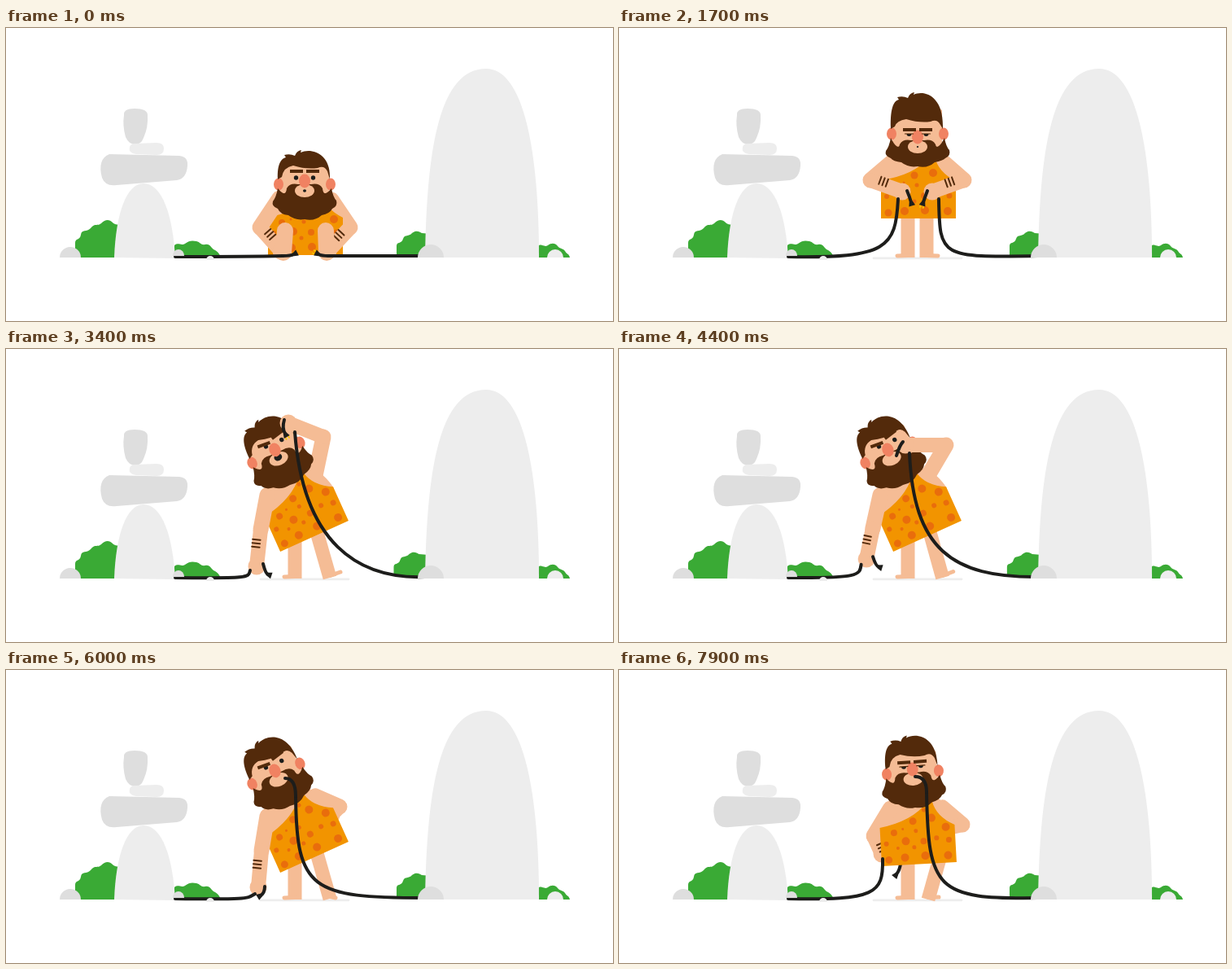
An HTML page with a canvas for the animation above (8000 ms loop, 746 px wide and 360 px high).

```html
<!DOCTYPE html>
<html lang="en">
<head>
<meta charset="utf-8">
<title>Caveman and the cable</title>
<style>
html, body { margin: 0; width: 100%; height: 100%; overflow: hidden; background: #fff; }
canvas { display: block; width: 746px; height: 360px; }
</style>
</head>
<body>
<canvas id="stage" width="746" height="360"></canvas>
<script>
const g = document.getElementById('stage').getContext('2d');
const LOOP = 8000, STEP = 100;
const SKIN = '#f5bc95', HAIR = '#532a0b', CLOTH = '#f29400', SPOT = '#e96d0c', RED = '#f08262',
  GREEN = '#3aaa35', PALE = '#ededed', GREY = '#dedede', INK = '#1d1d1b';

// head: x, y, tilt, look down, crown height. body: hem x, y, tilt. arms: elbow, hand.
// wires: two controls and end. tips: curve of the loose end. legs: top, ankle, toe.
// face: brow height, brow tilt, lids, mouth size, tongue.
// flags: sitting, left arm behind, right arm behind, fingers, biting, left bands, right bands.
const sit = {
  head: [367, 192, 0, 0, 0], body: [368, 279, 0],
  armL: [312, 245, 338, 274], armR: [423, 245, 396, 274],
  wireL: [250, 281, 300, 281, 340, 280], tipL: [340, 280, 350, 280, 354, 278],
  wireR: [480, 280, 430, 280, 396, 280], tipR: [396, 280, 388, 280, 384, 278],
  legL: [343, 249, 341, 276, 338, 278], legR: [393, 249, 394, 276, 397, 278],
  face: [-16, 0, 0, 2, 0], flags: [1, 0, 0, 0, 0, 1, 1], bush: [0]
};
const hold = {
  head: [367, 130, 0, 1, 9], body: [368, 234, 0],
  armL: [309, 187, 348, 201], armR: [424, 187, 385, 201],
  wireL: [330, 283, 340, 270, 343, 210], tipL: [354, 200, 357, 207, 359, 214],
  wireR: [395, 282, 394, 282, 393, 210], tipR: [379, 200, 376, 208, 374, 214],
  legL: [355, 225, 355, 282, 342, 280], legR: [378, 225, 378, 282, 392, 280],
  face: [-13, 0, 1, 1.2, 0], flags: [0, 0, 0, 0, 0, 1, 1], bush: [0]
};
const reach = {
  ...hold,
  head: [332, 127.5, -23.3, 0, 4], body: [379, 230, -24.3],
  armL: [322, 222, 325, 264], armR: [379, 108, 355, 75],
  wireL: [290, 281, 298, 281, 317, 258], tipL: [332, 262, 334, 274, 341, 278],
  wireR: [432, 283, 366, 236, 360, 85], tipR: [350, 70, 344, 77, 338, 83],
  legR: [381, 225, 394, 281, 407, 272],
  face: [-16, .25, 0, 5, 1], flags: [0, 0, 0, 0, 0, -1, 0], bush: [-3.5]
};
const aim = {
  ...reach,
  armL: [313, 222, 308, 267], armR: [390, 108, 347, 91],
  wireL: [300, 282, 298, 281, 300, 272], tipL: [316, 264, 319, 276, 322, 277],
  wireR: [432, 283, 365, 238, 355, 102], tipR: [342, 87, 339, 97, 343, 104],
  legR: [382, 225, 398, 281, 411, 274],
  face: [-16, .25, 0, 5, 0]
};
const bite = {
  ...aim,
  armR: [402, 118, 352, 118],
  wireR: [408, 281, 362, 245, 357, 128], tipR: [349, 114, 345, 118, 341, 131],
  face: [-16, .25, 0, 0, 0], flags: [0, 0, 0, 0, 1, -1, 0]
};
const lift = {
  ...bite,
  armL: [301, 214, 271, 181],
  wireL: [268, 281, 278, 248, 277, 203], tipL: [278, 180, 286, 186, 294, 188],
  legR: [382, 225, 394, 281, 408, 269],
  flags: [0, 0, 0, 1, 1, -.12, 0], bush: [0]
};
const mouth = {
  ...lift,
  armL: [314, 222, 310, 267], armR: [410, 168, 400, 178],
  wireL: [300, 282, 296, 281, 306, 275], tipL: [318, 266, 318, 274, 313, 277],
  wireR: [375, 280, 357, 270, 356, 155], tipR: [356, 155, 356, 133, 343, 133],
  legR: [382, 225, 398, 281, 405, 280],
  flags: [0, 0, 1, 0, 1, -1, 0]
};
const turn = {
  ...mouth,
  head: [361, 126, -4, 0, 4], body: [369, 238.5, -3.1],
  armL: [313, 204, 323, 226], armR: [422, 190, 405, 194],
  wireL: [315, 283, 325, 275, 324, 232], tipL: [346, 238, 345, 246, 341, 251],
  wireR: [390, 282, 380, 270, 378, 150], tipR: [378, 150, 378, 131, 364, 131],
  legR: [394, 232, 380, 282, 393, 279],
  face: [-13, 0, 1, 0, 0], flags: [0, 1, 1, 0, 1, 1, 0]
};
const track = [
  [0, sit], [400, sit], [900, hold], [1700, hold], [2100, reach], [3200, reach], [3400, aim],
  [3600, aim], [4100, bite], [4300, bite], [4800, lift], [5300, lift], [6000, mouth],
  [7000, mouth], [7500, turn], [LOOP, turn]
];

function poseAt(t) {
  let i = 0;
  while (i < track.length - 2 && t >= track[i + 1][0]) i++;
  const [t0, a] = track[i], [t1, b] = track[i + 1];
  const u = (t - t0) / (t1 - t0), e = u * u * (3 - 2 * u);
  const p = {};
  for (const k in a) p[k] = a[k].map((v, j) => v + (b[k][j] - v) * e);
  return p;
}

// Drawing helpers
function fill(d, color) {
  g.fillStyle = color;
  g.fill(new Path2D(d));
}
function oval(x, y, rx, ry, color, a = 0, b = Math.PI * 2) {
  g.fillStyle = color;
  g.beginPath();
  g.ellipse(x, y, rx, ry, 0, a, b);
  g.fill();
}
function stroke(d, w, color, cap = 'round') {
  g.lineWidth = w;
  g.strokeStyle = color;
  g.lineCap = cap;
  g.lineJoin = 'round';
  g.stroke(new Path2D(d));
}
const line = (x0, y0, x1, y1, w, color, cap) => stroke(`M${x0},${y0}L${x1},${y1}`, w, color, cap);
const mound = (x, y, rx, ry, color) => oval(x, y, rx, ry, color, Math.PI, 0);
function local(x, y, deg, draw) {
  g.save();
  g.translate(x, y);
  g.rotate(deg * Math.PI / 180);
  draw();
  g.restore();
}
function joint([x, y, deg], dx, dy) {
  const r = deg * Math.PI / 180, c = Math.cos(r), s = Math.sin(r);
  return [x + dx * c - dy * s, y + dx * s + dy * c];
}

function backdrop(shift) {
  fill('M85,282V264C85,258 91,261 92,254C93,247 99,251 104,246C109,239 113,244 117,240C122,235 127,235 131,239' +
    'C134,242 136,241 140,242V282Z', GREEN);
  fill('M207,282V267C212,263 215,268 220,265C225,261 229,261 234,262C239,263 239,267 245,266C251,265 252,270 255,272' +
    'C259,274 262,276 264,282Z', GREEN);
  local(shift, 0, 0, () =>
    fill('M480,279V268C480,262 486,266 488,259C490,253 495,257 499,252C504,248 508,250 511,252L523,253V279Z', GREEN));
  fill('M654,268C658,264 661,270 666,267C670,264 675,264 678,268C681,272 684,270 687,274C689,278 692,277 693,282H654Z', GREEN);
  mound(79, 282, 13, 13, GREY);
  fill('M145,107Q144,99 158,99Q174,99 174,107Q175,122 169,135Q166,143 159,143Q151,143 147,134Q143,120 145,107Z', GREY);
  fill('M152,146Q153,142 160,142L185,141Q194,141 194,148Q194,156 185,156L160,155Q150,154 152,146Z', PALE);
  fill('M127,155L213,157Q224,158 223,169Q222,185 210,187L136,193Q122,195 118,184Q112,161 127,155Z', GREY);
  fill('M133,282C135,228 148,191 169,191C192,191 205,230 208,283Z', PALE);
  fill('M515,282C517,150 532,50 590,50C636,50 655,150 655,282Z', PALE);
}
function pebbles() {
  mound(212, 280, 7, 8, GREY);
  mound(251, 285, 5, 5, PALE);
  mound(522, 282, 16, 16, GREY);
  mound(675, 282, 10, 10, PALE);
}

function bands(ex, ey, hx, hy, side, at) {
  const len = Math.hypot(hx - ex, hy - ey) || 1, s = Math.sign(side);
  const dx = (hx - ex) / len, dy = (hy - ey) / len, nx = dy * s, ny = -dx * s;
  const inner = 8.5 - 9.5 * Math.abs(side);
  for (let i = -1; i < 2; i++) {
    const x = ex + dx * (len * at + i * 4.5), y = ey + dy * (len * at + i * 4.5);
    line(x + nx * inner, y + ny * inner, x + nx * 8.5, y + ny * 8.5, 2, HAIR);
  }
}
function forearm([ex, ey, hx, hy], side, at) {
  line(ex, ey, hx, hy, 18, SKIN);
  oval(hx, hy, 10.5, 10.5, SKIN);
  if (side) bands(ex, ey, hx, hy, side, at);
}
function leg([x0, y0, x1, y1, tx, ty], seated) {
  if (seated) return line(x0, y0, x1, y1, 20, SKIN);
  line(x0, y0, x1, y1, 17, SKIN, 'butt');
  line(x1, y1 - 2.5, tx, ty, 5, SKIN);
}

const spots = [
  [-5, -53, 4.5], [18, -56, 5], [35, -44, 5], [-29, -40, 4], [-15, -29, 5], [-39, -27, 3],
  [-25, -21, 2], [-5, -21, 2.5], [7, -28, 4], [23, -31, 3], [38, -28, 3.5], [-37, -7, 4.5],
  [-17, -9, 5], [8, -10, 5], [36, -9, 5], [-2, -41, 2.5], [-18, -44, 1.5], [9, -66, 2.5]
];
const torso = () => fill('M-42,-42L-41,-60Q-38,-80 -18,-84H18Q40,-78 46,-45L40,-4H-40Z', SKIN);
function cloth() {
  fill('M-46,0V-47Q-5,-53 14,-76H20Q24,-57 46,-46V0Z', CLOTH);
  for (const [x, y, r] of spots) oval(x, y, r, r, SPOT);
}

function head(look, crown, [browY, browTilt, lid, size, tongue]) {
  const d = 8 * look, top = -crown, rim = 5 * look, chin = 3 * look;
  fill(`M-31,10V${-20 + top}Q0,${-46 + top} 30,${-20 + top}V10Q20,35 0,35Q-20,35 -31,10Z`, SKIN);
  oval(-32, 0, 6, 7.5, RED);
  oval(32, 0, 6, 7.5, RED);
  fill(`M-33,-6C-34,${-26 + top} -28,${-32 + top} -23,${-33 + top}L-25,${-36 + top}` +
    `Q-18,${-38 + top} -12,${-35 + top}Q-10,${-41 + top} -4,${-42 + top}L-5,${-39 + top}` +
    `C8,${-45 + top} 31,${-38 + top} 31,-10V-6L28,${-16 + rim}Q24,${-24 + rim} 16,${-20 + rim}` +
    `Q2,${-18 + rim} -14,${-23 + rim}Q-26,${-21 + rim} -28,-9Z`, HAIR);

  const by = 44 - chin;
  fill(`M-33,5C-28,${11 + d / 2} -23,${15 + d / 2} -22,${5 + d}Q-18,${-2 + d} -8,${d}H8Q18,${-2 + d} 22,${5 + d}` +
    `C23,${15 + d / 2} 28,${11 + d / 2} 33,5Q35,16 39,20Q41,27 34,30Q31,${by - 8} 21,${by - 6}` +
    `Q12,${by + 2} 0,${by - 1}Q-11,${by + 1} -20,${by - 6}Q-30,${by - 7} -33,30Q-41,27 -39,21Q-35,16 -33,5Z`, HAIR);
  oval(0, 8 + d, 12, 8, SKIN);

  const angry = browTilt / .25, mx = -7 * tongue;
  if (size > .5) oval(mx, 8 + d - 2 * angry - tongue, size, size * .85, INK);
  if (tongue > .5) oval(mx - 1, 7 + d, 4, 2.5, '#e30613');
  oval(0, -4 + d, 7, 8.5, RED);

  for (const s of [-1, 1]) {
    const x = s * 10.5 + 2 * angry, y = -8 + d - 4 * angry;
    if (lid > .5) {
      oval(x, y, 3, 3, INK, 0, Math.PI);
      line(x - 5, y, x + 5, y, 1.2, HAIR);
    } else oval(x, y, 2.7, 2.7, INK);
    const bx = s * 10, yb = browY + d - (s > 0 ? 4 : -1) * angry;
    const k = browTilt * (s > 0 ? 8 : -2);
    line(bx - 8, yb + k, bx + 8, yb - k, 4, HAIR, 'butt');
  }
}

function wire(x, y, [a, b, c, d, ex, ey]) {
  stroke(`M${x},${y}C${a},${b} ${c},${d} ${ex},${ey}`, 4, INK);
}
function tip([x, y, cx, cy, ex, ey], plug, copper) {
  stroke(`M${x},${y}Q${cx},${cy} ${ex},${ey}`, 4, INK);
  if (!plug) return;
  local(ex, ey, Math.atan2(ey - cy, ex - cx) * 180 / Math.PI, () => {
    if (copper) {
      line(4, -2, 7, -2, 1.6, '#f7c600');
      line(4, 2, 7, 2, 1.6, '#f7c600');
    }
    fill('M-1,-2L4.5,-4V4L-1,2Z', INK);
  });
}

function draw(t) {
  const p = poseAt(t);
  const [seated, backL, backR, fingers, biting, sideL, sideR] = p.flags;
  const sitting = seated > .5, inBody = f => local(...p.body, f);
  const shL = joint(p.body, -32, -70), shR = joint(p.body, 32, -68);
  const armL = () => {
    line(...shL, p.armL[0], p.armL[1], 19, SKIN);
    forearm(p.armL, sideL, backL > .5 ? .68 : .38);
    if (fingers > .3) {
      const [, , x, y] = p.armL;
      line(x, y, x + 3, y - 21 * fingers, 6.5, SKIN);
      line(x + 3, y, x + 15 * fingers, y - 19 * fingers, 6.5, SKIN);
    }
  };
  const legs = () => { leg(p.legL, sitting); leg(p.legR, sitting); };

  g.clearRect(0, 0, 746, 360);
  backdrop(p.bush[0]);
  if (!sitting) {
    line(313, 282.8, 421, 282.8, 2.8, PALE);
    legs();
  }
  inBody(torso);
  line(...shR, p.armR[0], p.armR[1], 19, SKIN);
  if (backR > .5) forearm(p.armR, 0);
  if (backL > .5) {
    tip(p.tipL, true);
    armL();
  }
  inBody(cloth);
  if (backL <= .5) armL();
  if (sitting) {
    forearm(p.armR, -sideR, .42);
    legs();
  }
  const [hx, hy, tilt, look, crown] = p.head;
  local(hx, hy, tilt, () => head(look, crown, p.face));
  if (!sitting && backR <= .5) forearm(p.armR, -sideR, .42);

  wire(208, 281, p.wireL);
  wire(515, 280, p.wireR);
  if (backL <= .5) tip(p.tipL, true);
  tip(p.tipR, biting < .5, true);
  pebbles();
}

function tick(now) {
  draw(Math.floor(now % LOOP / STEP) * STEP);
  requestAnimationFrame(tick);
}
draw(0);
requestAnimationFrame(tick);
</script>
</body>
</html>
```
